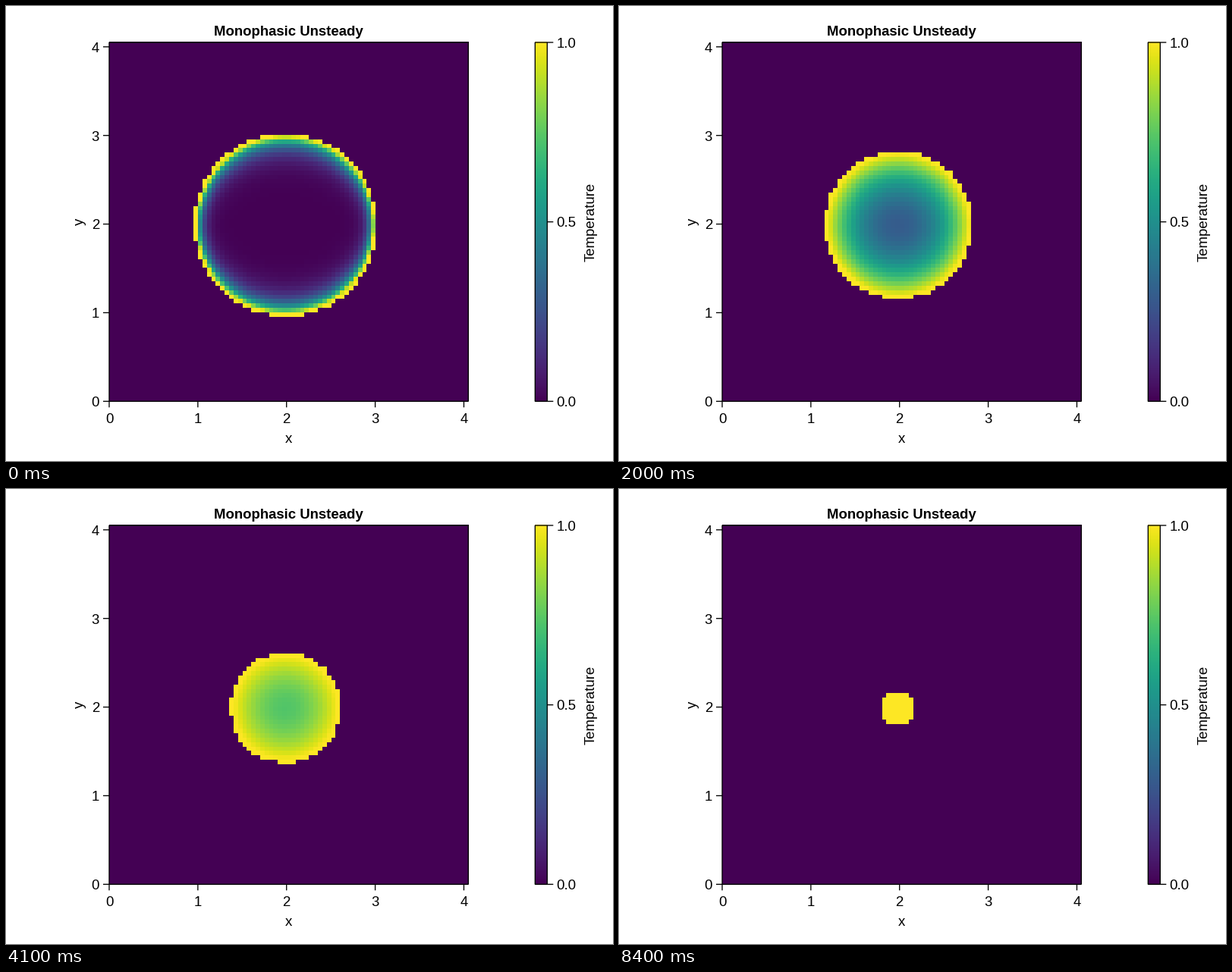
A matplotlib script for the animation above (8500 ms loop, 800x600 px).

```python
import numpy as np
import matplotlib
import matplotlib.pyplot as plt
from matplotlib.animation import FuncAnimation
from matplotlib.patches import Rectangle

matplotlib.rcParams["font.family"] = "Liberation Sans"

FRAMES = 85
N, H = 81, 0.05              # cells per side, cell size
CENTER = 1.985
DIFF = 0.005                 # diffusion per frame
LEFT, RIGHT, TOP, BOTTOM = 136.0, 609.3, 48.0, 521.3
UNIT = (RIGHT - LEFT) / (N * H)
PX = 0.72                    # points per pixel at 100 dpi
SIZE = 18.67 * PX
LINE = 1.33 * PX

edges = np.arange(N) * H
mid = edges + H / 2 - CENTER
X, Y = np.meshgrid(mid, mid)
gap = np.maximum(np.abs(mid) - H / 2, 0)
NEAR = np.hypot(*np.meshgrid(gap, gap))


def arms(along, across, radius):
    """Distances to the two neighbours, cut short at the circle."""
    half = np.sqrt(np.maximum(radius**2 - across**2, 0))
    ahead = np.clip((half - along) / H, 0.1, 1)
    back = np.clip((half + along) / H, 0.1, 1)
    return ahead, back


def diffuse(temp, radius, dx, dy):
    """One implicit step, with the value 1 on and beyond the circle."""
    inside = np.hypot(X, Y) < radius
    e, w = arms(X, Y, radius)
    n, s = arms(Y, X, radius)
    kx, ky = 2 * dx / H**2, 2 * dy / H**2
    ce, cw = kx / (e * (e + w)), kx / (w * (e + w))
    cn, cs = ky / (n * (n + s)), ky / (s * (n + s))
    diag = 1 + ce + cw + cn + cs
    start = np.where(inside, temp, 1.0)
    new = start.copy()
    for _ in range(120):
        total = (start + ce * np.roll(new, -1, 1) + cw * np.roll(new, 1, 1)
                 + cn * np.roll(new, -1, 0) + cs * np.roll(new, 1, 0))
        new = np.where(inside, total / diag, 1.0)
    return new


def simulate():
    temp = np.zeros((N, N))
    fields = []
    for i in range(FRAMES):
        radius = 1 - 0.01 * i
        skew = np.exp(-i / 8)
        temp = diffuse(temp, radius, DIFF * (1 - 0.6 * skew),
                       DIFF * (1 + 1.6 * skew))
        fields.append(np.where(NEAR < radius, temp, 0.0))
    return fields


fields = simulate()

fig = plt.figure(figsize=(8, 6), dpi=100, facecolor="white")
ax = fig.add_axes([0, 0, 1, 1])
ax.axis("off")


def label(x, y, text, ha="center", **kw):
    ax.text(x, y, text, ha=ha, va="baseline", fontsize=SIZE, color="black", **kw)


def side_label(x, y, text):
    ax.text(x, y, text, ha="right", va="center", rotation=90,
            rotation_mode="default", fontsize=SIZE, color="black")


def line(x0, y0, x1, y1):
    ax.plot([x0, x1], [y0, y1], color="black", lw=LINE, snap=False,
            solid_capstyle="butt")


def frame_box(x0, x1):
    ax.add_patch(Rectangle((x0, TOP), x1 - x0, BOTTOM - TOP, fill=False,
                           ec="black", lw=LINE, snap=False, zorder=3))


def image(data, x0, x1):
    return ax.imshow(data, extent=(x0, x1, BOTTOM, TOP), origin="lower",
                     cmap="viridis", vmin=0, vmax=1, aspect="auto",
                     interpolation="nearest")


heat = image(fields[0], LEFT, RIGHT)
frame_box(LEFT, RIGHT)
for k in range(5):
    x, y = LEFT + k * UNIT, BOTTOM - k * UNIT
    line(x, BOTTOM, x, BOTTOM + 8)
    line(LEFT - 8, y, LEFT, y)
    label(x, 550, str(k))
    label(123, y + 6.8, str(k), ha="right")

BAR0, BAR1 = 697.3, 713.3
image(np.linspace(0, 1, 256)[:, None], BAR0, BAR1)
frame_box(BAR0, BAR1)
for v in (0.0, 0.5, 1.0):
    y = BOTTOM - v * (BOTTOM - TOP)
    line(BAR1, y, BAR1 + 8, y)
    label(725.3, y + 6.8, f"{v:.1f}", ha="left")

label(372.6, 39, "Monophasic Unsteady", weight="bold")
label(372.6, 576, "x")
side_label(105.5, 284.7, "y")
side_label(780, 284.7, "Temperature")

ax.set_xlim(0, 800)
ax.set_ylim(600, 0)


def update(i):
    heat.set_data(fields[i])
    return [heat]


anim = FuncAnimation(fig, update, frames=FRAMES, interval=100, repeat=True,
                     init_func=lambda: update(0))
plt.show()
```
